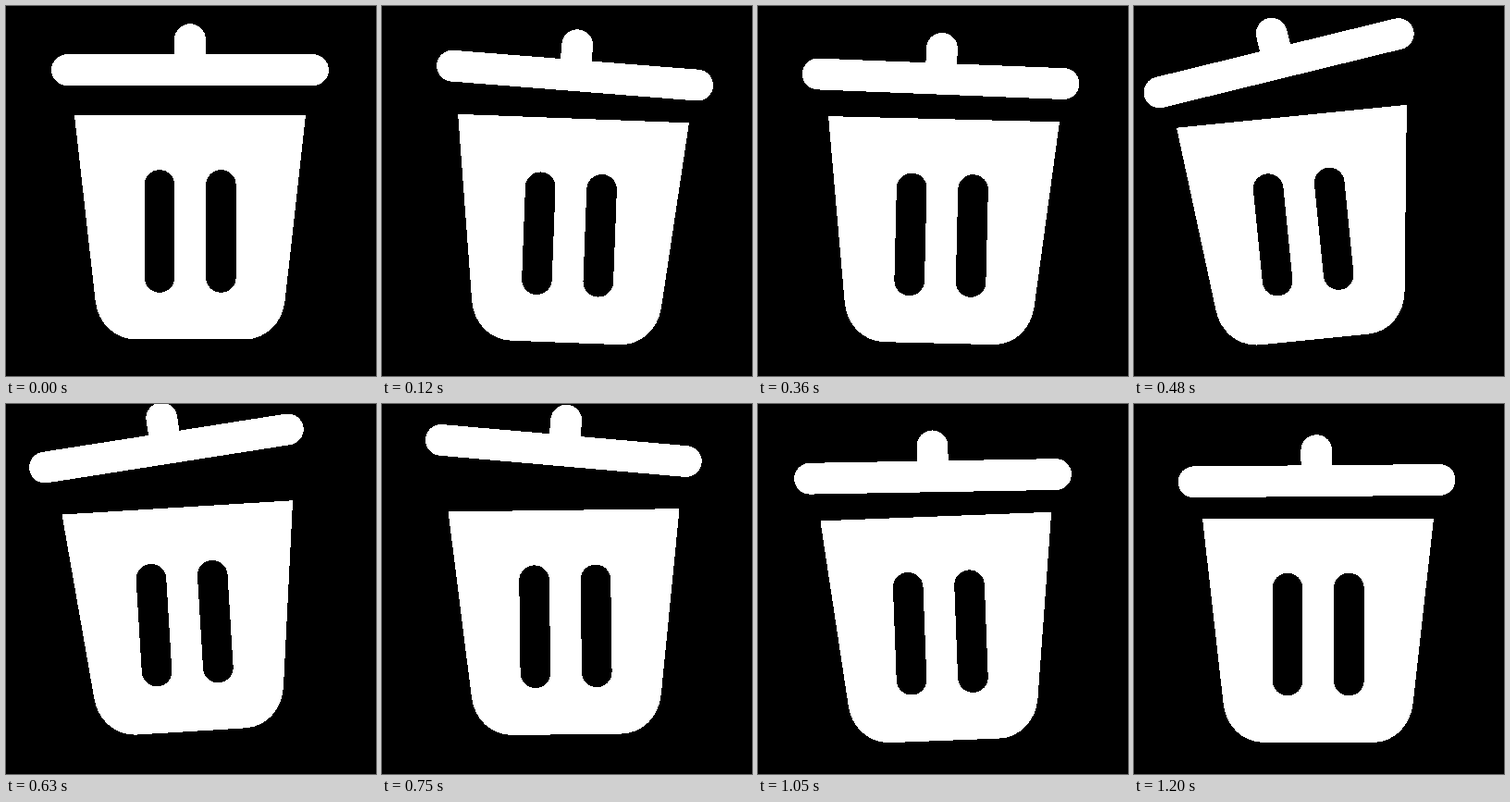
Write an HTML page that moves like this. It is 400 by 400 pixels and loops after 3230 ms.

```html
<!DOCTYPE html>
<html lang="en">
<head>
<meta charset="utf-8">
<title>Bin</title>
<style>
html, body { margin: 0; width: 100%; height: 100%; overflow: hidden; background: #000; }
svg { display: block; width: 100%; height: 100%; shape-rendering: crispEdges; }
.stroke { fill: none; stroke-linecap: round; }
</style>
</head>
<body>
<svg viewBox="0 0 400 400">
  <g id="bin">
    <path fill="#fff" d="M75 123.5H323Q324 123.5 323.9 124.5L301.6 324C299 348 281 366 258 366H141C117 366 99 348 96.6 324L74.1 124.5Q74 123.5 75 123.5Z"/>
    <path class="stroke" stroke="#000" stroke-width="32.6" d="M166 199V299M232.4 199V299"/>
    <path id="lid" class="stroke" stroke="#fff" stroke-width="33.8" d="M-133 0H133M0 0V-33"/>
  </g>
</svg>
<script>
const LOOP = 3230, STEP = 30, END = 1200;
const FOOT = 55, RIM = 122;   // half widths that the bin and the lid tip over
const bin = document.getElementById('bin');
const lid = document.getElementById('lid');

// Key poses of the swing, at shared times
const times = [0, 270, 500, 630, 870, 1050, END];
const lean  = [0, 5.2, -5.95, -3.5, 0.9, -2.2, 0];
const slide = [0, -3.3, -4.4, 1.1, 0.4, 2.6, 0];
const tilt  = [0, 10.8, -14.3, -8.9, 14.25, -1, -0.5];
const shift = [0, -1.7, -8.2, -8, 6.7, -1.6, -1.4];

const sin = deg => Math.sin(deg * Math.PI / 180);

// Flat at turning points, otherwise passing through
function slope(v, i) {
  const turns = !((v[i] - v[i - 1]) * (v[i + 1] - v[i]) > 0);
  return turns ? 0 : (v[i + 1] - v[i - 1]) / (times[i + 1] - times[i - 1]);
}

function at(v, t) {
  const i = Math.max(0, times.findIndex(k => k >= t) - 1);
  const d = times[i + 1] - times[i];
  const u = (t - times[i]) / d, w = 1 - u;
  return w * w * (1 + 2 * u) * v[i] + u * u * (3 - 2 * u) * v[i + 1]
    + d * u * w * (w * slope(v, i) - u * slope(v, i + 1));
}

function draw(ms) {
  const t = Math.min(END, Math.floor((ms % LOOP) / STEP) * STEP);
  const hop = Math.max(0, Math.sin(Math.PI * (t - 480) / 400)) * (t < 880);
  const angle = at(lean, t), open = at(tilt, t) - angle;
  const rise = FOOT * Math.abs(sin(angle)) + 9.4 * hop;
  const sag = 2.2 * (t / END) ** 8;
  const lift = RIM * Math.abs(sin(open)) + 12.5 * hop - sag;
  bin.setAttribute('transform', `translate(${at(slide, t)} ${-rise}) rotate(${angle} 199 366)`);
  lid.setAttribute('transform', `translate(${199 + at(shift, t)} ${82 - lift}) rotate(${open})`);
}

const start = performance.now();
function tick() {
  draw(performance.now() - start);
  requestAnimationFrame(tick);
}
draw(0);
requestAnimationFrame(tick);
</script>
</body>
</html>
```
